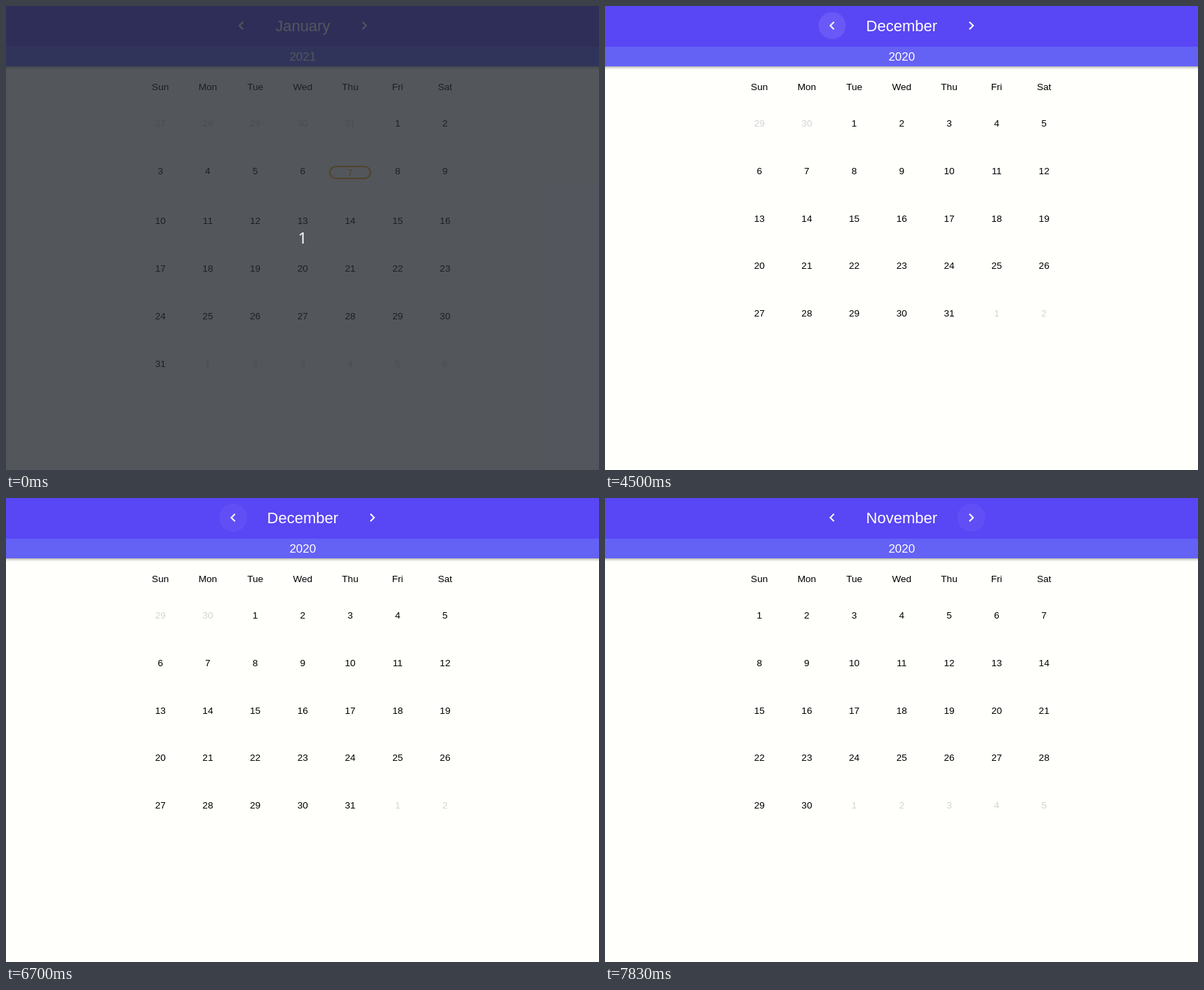
Write an HTML page that moves like this. It is 846x662 px and loops after 8000 ms.

```html
<!DOCTYPE html>
<html lang="en">
<head>
<meta charset="utf-8">
<title>Calendar</title>
<style>
  html, body { margin: 0; width: 100%; height: 100%; overflow: hidden; background: #fffffc; }
  svg { display: block; width: 846px; height: 662px; }
  text { font-family: "Liberation Sans", Arial, sans-serif; font-size: 13.6px; text-anchor: middle; fill: #000; }
  .title { font-size: 22px; fill: #fff; }
  .year { font-size: 17px; fill: #fff; }
  .outside { fill: #d3d3d3; }
  .today { fill: #f0ae13; }
  .count { font-family: "Noto Sans", sans-serif; font-size: 22px; fill: #fff; }
</style>
</head>
<body>
<svg viewBox="0 0 846 662">
  <defs>
    <linearGradient id="shade" x2="0" y2="1">
      <stop offset="0" stop-opacity=".32"/>
      <stop offset=".4" stop-opacity=".13"/>
      <stop offset="1" stop-opacity="0"/>
    </linearGradient>
  </defs>
  <rect width="846" height="662" fill="#fffffc"/>
  <rect y="86" width="846" height="5" fill="url(#shade)"/>
  <rect width="846" height="58" fill="#5946f4"/>
  <rect y="58" width="846" height="28" fill="#6461f5"/>
  <g id="prev">
    <circle class="hover" r="20" fill="#fff" fill-opacity=".05"/>
    <circle id="ripple" fill="#fff"/>
    <path transform="translate(-12 -12)" fill="#fff" d="M15.41 7.41L14 6l-6 6 6 6 1.41-1.41L10.83 12z"/>
  </g>
  <g id="next">
    <circle class="hover" r="20" fill="#fff" fill-opacity=".05"/>
    <path transform="translate(-12 -12)" fill="#fff" d="M10 6L8.59 7.41 13.17 12l-4.58 4.59L10 18l6-6z"/>
  </g>
  <text class="title" id="title" x="423.3" y="36"></text>
  <text class="year" id="year" x="423.3" y="78"></text>
  <g id="weekdays"></g>
  <g id="days"></g>
  <g id="countdown">
    <rect width="846" height="662" fill="#242830" fill-opacity=".785"/>
    <text class="count" x="423" y="339">1</text>
  </g>
</svg>
<script>
const LOOP = 8000;
const CENTER = 423.3;
const PITCH = 67.7;
const $ = id => document.getElementById(id);

const months = [
  { from: 0, name: "January", year: 2021, index: 0, arrow: 87.8, today: 7 },
  { from: 4330, name: "December", year: 2020, index: 11, arrow: 99.3 },
  { from: 7100, name: "November", year: 2020, index: 10, arrow: 99.3 }
];
const clicks = [4330, 7100];
const hovers = {
  prev: [[4330, 5130], [6370, 6530], [6700, 7500]],
  next: [[5500, 5600], [5800, 6300], [7830, LOOP]]
};

function add(parent, tag, attrs, content = "") {
  const el = document.createElementNS("http://www.w3.org/2000/svg", tag);
  for (const key in attrs) el.setAttribute(key, attrs[key]);
  el.textContent = content;
  parent.append(el);
}

const columnX = col => CENTER + (col - 3) * PITCH;

["Sun", "Mon", "Tue", "Wed", "Thu", "Fri", "Sat"].forEach((name, col) =>
  add($("weekdays"), "text", { x: columnX(col), y: 120 }, name));

function drawMonth(month) {
  const { year, index, today } = month;
  const lead = new Date(year, index, 1).getDay();
  const length = new Date(year, index + 1, 0).getDate();
  const cells = Math.ceil((lead + length) / 7) * 7;
  const days = $("days");

  $("title").textContent = month.name;
  $("year").textContent = year;
  $("prev").setAttribute("transform", `translate(${CENTER - month.arrow} 28)`);
  $("next").setAttribute("transform", `translate(${CENTER + month.arrow} 28)`);
  days.replaceChildren();

  for (let i = 0; i < cells; i++) {
    const date = new Date(year, index, i - lead + 1);
    const day = date.getDate();
    const row = Math.floor(i / 7);
    const x = columnX(i % 7);
    const inside = date.getMonth() === index;
    const isToday = inside && day === today;
    // The outlined day makes its row taller and pushes later rows down.
    const push = today && row > 1 ? 3.75 : 0;
    const y = Math.round(172.3 + row * PITCH + push) + (isToday ? 2 : 0);
    if (isToday) {
      add(days, "rect", {
        x: x - 29, y: y - 13, width: 58, height: 17, rx: 8.5,
        fill: "none", stroke: "#f0ae13", "stroke-width": 2
      });
    }
    add(days, "text", { x, y, class: isToday ? "today" : inside ? "" : "outside" }, day);
  }
}

const clamp = v => Math.min(1, Math.max(0, v));
const easeOut = v => 1 - (1 - v) ** 2;

let shown;
function render(t) {
  const month = months.findLast(m => t >= m.from);
  if (month !== shown) drawMonth(shown = month);

  for (const id in hovers) {
    const over = hovers[id].some(([start, end]) => t >= start && t < end);
    $(id).querySelector(".hover").style.display = over ? "" : "none";
  }

  const click = clicks.findLast(c => t >= c);
  const age = click === undefined ? Infinity : t - click;
  $("ripple").setAttribute("r", 11 + 9 * easeOut(clamp(age / 270)));
  $("ripple").setAttribute("fill-opacity", 0.06 * (1 - clamp((age - 170) / 270)));

  $("countdown").style.display = t < 30 ? "" : "none";
}

const began = performance.now();
function tick() {
  render((performance.now() - began) % LOOP);
  requestAnimationFrame(tick);
}
render(0);
requestAnimationFrame(tick);
</script>
</body>
</html>
```
